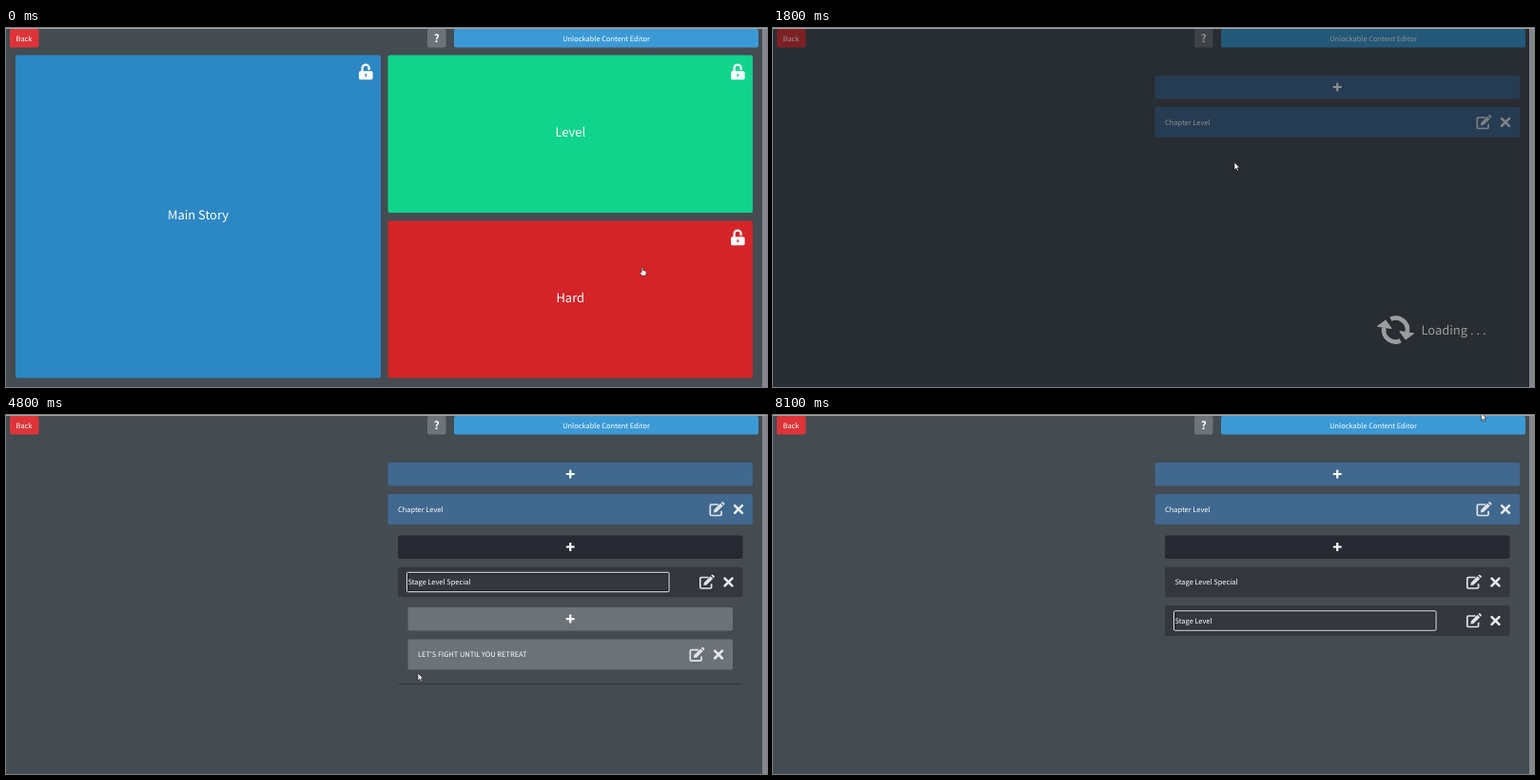
Animation of 800x377 px, one loop 8200 ms. Source, as an HTML page:

```html
<!DOCTYPE html>
<html lang="en">
<head>
<meta charset="utf-8">
<title>Unlockable Content Editor</title>
<style>
html, body { margin: 0; width: 100%; height: 100%; overflow: hidden; background: #444c52; }
#stage { display: block; width: 100%; height: 100%; }
text { font-family: "Noto Sans CJK JP", "Noto Sans CJK SC", "Noto Sans", sans-serif; text-rendering: geometricPrecision; }
</style>
</head>
<body>
<svg id="stage" viewBox="0 0 800 377" preserveAspectRatio="none"></svg>
<script>
const LOOP = 8200, STEP = 100;
const LIST_TOP = 50, LIST_END = 342;
const ROW = 32, GAP = 8.5, ADD = 33.5, INDENT = 10.5;
const SMALL = 7.45, LARGE = 12.95;
const BLUE = '#41688f', NIGHT = '#272a33', COAL = '#34373d', GREY = '#6b7278';

const QUESTS = ['Level Quest 7 - Monsters on Rampage!', 'Level Quest 6 - Guards', 'Level Quest 5 - Haunted'];
const QUEST_COUNT = 7;

// time, x, y of the pointer
const PATH = [
  [0, 669, 251], [400, 600, 178], [800, 498, 133], [1500, 491, 136], [1800, 485, 141],
  [2500, 486, 104], [3100, 486, 104], [3500, 462, 160], [3800, 438, 212], [4000, 438, 212],
  [4350, 434, 176], [4500, 434, 178], [4800, 433, 271], [4950, 433, 268], [5150, 450, 177],
  [5500, 450, 178], [5900, 450, 216], [6250, 450, 217], [6600, 451, 251], [6800, 451, 249],
  [7100, 463, 176], [7500, 465, 175], [8100, 744.5, -2]
];

const stage = document.getElementById('stage');
const clamp = v => Math.max(0, Math.min(1, v));
const swing = v => 0.5 - Math.cos(clamp(v) * Math.PI) / 2;
const slide = (t, start) => swing((t - start) / 400);

const rect = (x, y, w, h, fill, r = 2) =>
  `<rect x="${x}" y="${y}" width="${Math.max(0, w)}" height="${Math.max(0, h)}" rx="${r}" fill="${fill}"/>`;
const text = (x, cy, str, size = SMALL, anchor = 'start', extra = '') =>
  `<text x="${x}" y="${cy + size * 0.366}" font-size="${size}" text-anchor="${anchor}" fill="#fff" ${extra}>${str}</text>`;
const clip = (x, y, w, h, body) => h <= 0.05 ? '' :
  `<svg x="${x}" y="${y}" width="${w}" height="${h}" viewBox="${x} ${y} ${w} ${h}" overflow="hidden">${body}</svg>`;
const at = (x, y, body, turn = 0) => `<g transform="translate(${x} ${y}) rotate(${turn})">${body}</g>`;

const plus = (x, y) => at(x, y, rect(-4.5, -1.1, 9, 2.2, '#fff', 0.6) + rect(-1.1, -4.5, 2.2, 9, '#fff', 0.6));
const cross = (x, y) => at(x, y, '<path d="M-3.9-3.9L3.9 3.9M3.9-3.9L-3.9 3.9" stroke="#e6e8ea" stroke-width="2.6" stroke-linecap="round"/>');
const pencil = (x, y) => at(x, y,
  '<path d="M1.5-5H-6q-1.2 0-1.2 1.2V5.3q0 1.2 1.2 1.2H3.4q1.2 0 1.2-1.2V1.8" fill="none" stroke="#e0e3e5" stroke-width="1.7"/>' +
  '<path d="M-3.6 3.5L-3.2 .4L3.6-6.2L6.2-3.6L-.6 3.1ZM4.3-6.9L5.3-7.7Q5.9-8 6.5-7.5L7.7-6.2Q8.1-5.6 7.7-5L6.9-4.2Z" fill="#e0e3e5"/>');
const lock = (x, y, slot) => at(x, y,
  '<path d="M3.6 9V4.9a3.4 3.4 0 0 1 7 0V6" fill="none" stroke="#fff" stroke-width="2.3" stroke-linecap="round"/>' +
  rect(0, 8, 14.6, 9, '#fff', 1.6) + rect(6.5, 10.8, 1.6, 3.4, slot, 0.8));

const arrow = '<path d="M0 0V8L1.9 6.3L3.2 9L4.4 8.4L3.2 5.8H5.6Z" fill="#fff" stroke="#111" stroke-width=".6"/>';
const hand = '<path d="M-.8 1Q0-.2 .7 1V3.6L3.4 4.2Q4.4 4.6 4.2 6L3.5 9H-.6L-2.8 5.8Q-2.6 4.8-1.6 5.4L-.8 6Z" fill="#fff" stroke="#222" stroke-width=".6"/>';
const beam = '<path d="M-1.6-4H1.6M0-4V4M-1.6 4H1.6" fill="none" stroke="#14171a" stroke-width=".9"/>';

function pointer(t) {
  const i = PATH.findIndex(p => p[0] > t);
  if (i < 0) return PATH[PATH.length - 1].slice(1);
  const [t0, x0, y0] = PATH[i - 1], [t1, x1, y1] = PATH[i];
  const k = swing((t - t0) / (t1 - t0));
  return [x0 + (x1 - x0) * k, y0 + (y1 - y0) * k];
}

function card(x, y, w, h, fill, label) {
  return rect(x, y, w, h, fill) + text(x + w / 2, y + h / 2 - 1.5, label, LARGE, 'middle') + lock(x + w - 23, y + 8.7, fill);
}

const menu = () =>
  card(10, 28.5, 384, 339, '#2c88c4', 'Main Story') +
  card(401.5, 28.5, 383.5, 165.5, '#10d38c', 'Level') +
  card(401.5, 202.5, 383.5, 165, '#d42428', 'Hard');

function header() {
  return rect(4, 1, 30.5, 19.5, '#de3439') + text(19, 11, 'Back', SMALL, 'middle') +
    rect(443, 1, 19.5, 19.5, '#6c747b') + text(452.8, 10.8, '?', 11.5, 'middle', 'font-weight="900"') +
    rect(471, 1, 320, 19.5, '#3b9ad6') + text(631, 11, 'Unlockable Content Editor', SMALL, 'middle');
}

function editor(t, [px, py]) {
  const chap = slide(t, 2708);
  const spec = slide(t, 4450) - slide(t, 5200);
  const lev = slide(t, 6150) - slide(t, 7300);
  const focus = t < 2700 ? '' : t < 4450 ? 'Chapter Level' : t < 6150 ? 'Stage Level Special' : 'Stage Level';
  let overField = false;

  const childHeight = (n, p) => p * (11 + ADD + n * (ROW + GAP));
  const specHeight = (ROW + GAP) * (1 - lev) + childHeight(1, spec);
  const levHeight = (ROW + GAP) * (1 - spec) + childHeight(QUEST_COUNT, lev);
  const y0 = 115 + 11.5 * chap;
  const total = y0 + 33 + specHeight + levHeight - LIST_TOP;
  const scrolls = chap === 1 && total - GAP > LIST_END - LIST_TOP;
  const right = scrolls ? 780 : 785;
  const span = depth => [401.5 + INDENT * depth, right - INDENT * depth];

  const addBar = (depth, y, fill) => {
    const [l, r] = span(depth);
    return rect(l, y, r - l, 24.5, fill) + plus((l + r) / 2, y + 12);
  };

  const row = (depth, y, fill, label) => {
    const [l, r] = span(depth), w = r - l, cy = y + 16;
    const fx = l + 9.5, fw = w * 0.76;
    if (px > fx && px < fx + fw && Math.abs(py - cy) < 10.5 && py < LIST_END) overField = true;
    const ring = label !== focus ? '' :
      `<rect x="${fx + 1}" y="${cy - 9.2}" width="${fw - 2}" height="18.4" fill="none" stroke="#17191c"/>` +
      `<rect x="${fx}" y="${cy - 10.2}" width="${fw}" height="20.4" rx="1" fill="none" stroke="#e4e6e8"/>`;
    return rect(l, y, w, ROW, fill) + ring + text(l + INDENT, cy, label) + pencil(r - 37.5, cy) + cross(r - 15, cy);
  };

  // A stage row that can fold away, with its quests below it
  const stageRow = (y, label, shown, open, names, n) => {
    const top = y + ROW * shown + 11 * open;
    const quests = open <= 0 ? '' : clip(400, top, 400, open * (ADD + n * (ROW + GAP)),
      addBar(2, top, GREY) + names.map((s, i) => row(2, top + ADD + i * (ROW + GAP), GREY, s)).join(''));
    return (shown > 0 ? clip(400, y, 400, ROW * shown, row(1, y, COAL, label)) : '') + quests;
  };

  let inner = '';
  if (chap > 0) {
    inner = addBar(1, y0, NIGHT) +
      stageRow(y0 + 33, 'Stage Level Special', 1 - lev, spec, ["LET'S FIGHT UNTIL YOU RETREAT"], 1) +
      stageRow(y0 + 33 + specHeight, 'Stage Level', 1 - spec, lev, QUESTS, QUEST_COUNT);
    if (chap < 1) inner = clip(400, y0, 400, 105.5 * chap, inner);
  }
  let out = clip(400, LIST_TOP, 400, LIST_END - LIST_TOP,
    addBar(0, LIST_TOP, BLUE) + row(0, 83, BLUE, 'Chapter Level') + inner);
  if (scrolls) {
    const h = LIST_END - LIST_TOP;
    out += rect(784, LIST_TOP, 5, h, '#bfc3c6') + rect(784, LIST_TOP, 5, h * h / total, '#858a8f');
  }
  return { out, overField };
}

function loader(t) {
  const shade = slide(t, 950) - slide(t, 1590);
  if (shade <= 0) return '';
  const half = '<path d="M-12.2-2.5A12.4 12.4 0 0 1 9-8.6" fill="none" stroke="#fff" stroke-width="4.6"/>' +
    '<path d="M14.2-13V-2.8H4Z" fill="#fff" stroke="#fff" stroke-width="1.2" stroke-linejoin="round"/>';
  return `<g opacity="${shade}">` + rect(0, 0, 795, 377, '#07090b', 0) +
    at(654.5, 317, half + at(0, 0, half, 180), 0.18 * (t - 1500)) +
    text(681.5, 317, 'Loading . . .', LARGE) + '</g>';
}

function draw(t) {
  const pos = pointer(t);
  const page = t < 1450 ? { out: menu(), overField: false } : editor(t, pos);
  const loading = t >= 950 && t < 1990;
  const shape = t < 950 ? hand : page.overField && !loading ? beam : arrow;
  stage.innerHTML = rect(0, 0, 800, 377, '#444c52', 0) + header() + page.out + loader(t) +
    rect(795, 0, 5, 377, '#85868d', 0) + rect(0, 0, 800, 1, '#a2a5a8', 0) + at(pos[0], pos[1], shape);
}

let last = -1;
function tick(now) {
  const t = Math.floor((now % LOOP) / STEP) * STEP;
  if (t !== last) draw(last = t);
  requestAnimationFrame(tick);
}
draw(0);
requestAnimationFrame(tick);
</script>
</body>
</html>
```
